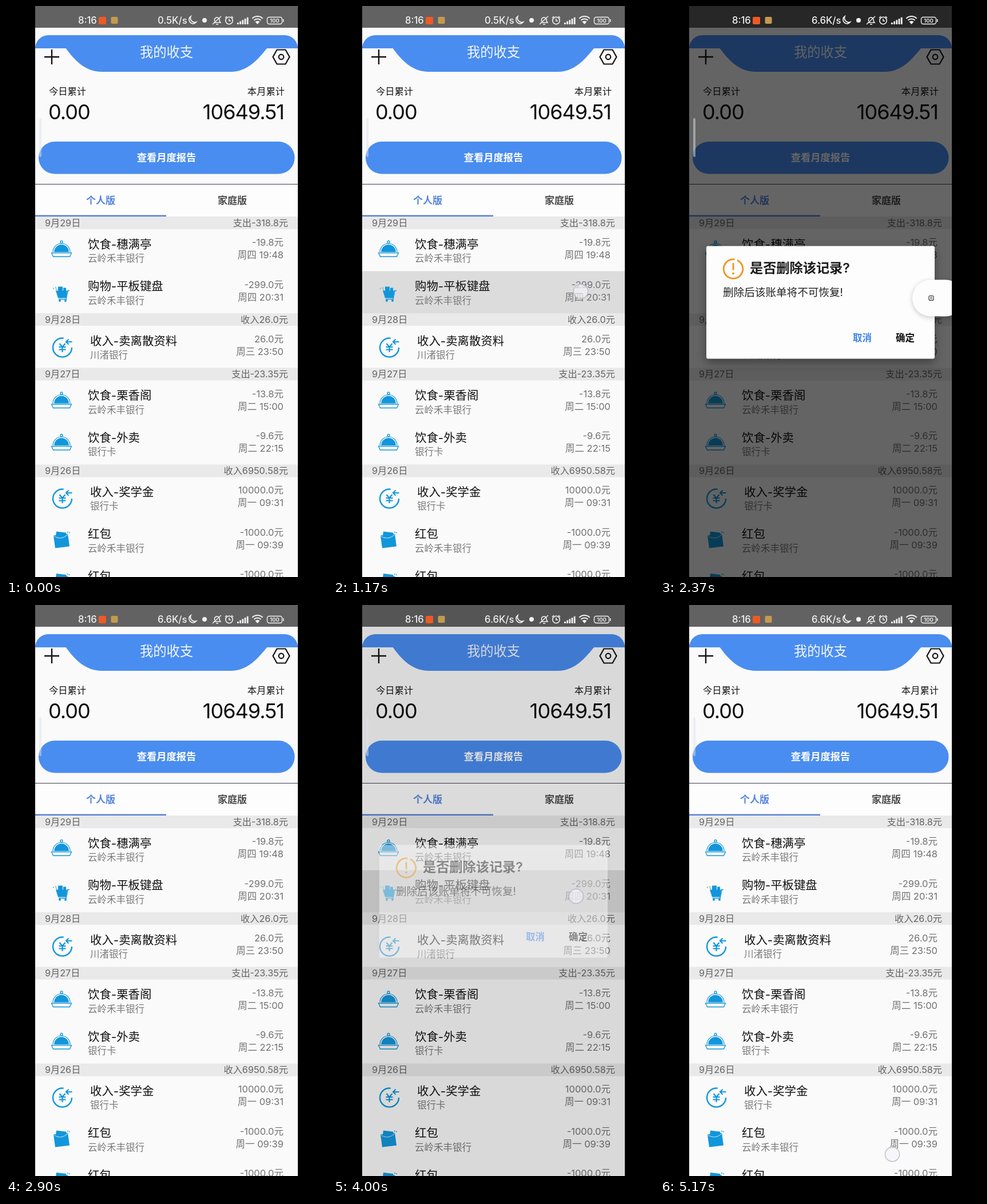
An HTML page with a canvas that plays this animation: 561 by 998 pixels, repeating every 5210 ms.

```html
<!DOCTYPE html>
<html lang="zh-CN">
<head>
<meta charset="utf-8">
<title>我的收支</title>
<style>
html, body { margin: 0; width: 100%; height: 100%; overflow: hidden; background: #000; }
canvas { display: block; }
</style>
</head>
<body>
<canvas id="stage" width="561" height="998"></canvas>
<script>
const ctx = document.getElementById('stage').getContext('2d');
const LOOP = 5210, L = 51, R = 510, W = R - L;
const FONT = '"Inter", "Noto Sans CJK SC", "Noto Sans CJK", sans-serif';
const BLUE = '#4a8df0', ICON = '#1296db', PAPER = '#fafafa';

// [top, date, sum]
const HEADERS = [
  [368, '9月29日', '支出-318.8元'],
  [537, '9月28日', '收入26.0元'],
  [632.5, '9月27日', '支出-23.35元'],
  [801.5, '9月26日', '收入6950.58元']
];
// [top, icon, name, bank, sum, time]
const ROWS = [
  [390, dish, '饮食-穗满亭', '云岭禾丰银行', '-19.8元', '周四 19:48'],
  [463.5, cart, '购物-平板键盘', '云岭禾丰银行', '-299.0元', '周四 20:31'],
  [559, income, '收入-卖离散资料', '川渚银行', '26.0元', '周三 23:50'],
  [654.5, dish, '饮食-栗香阁', '云岭禾丰银行', '-13.8元', '周二 15:00'],
  [728, dish, '饮食-外卖', '银行卡', '-9.6元', '周二 22:15'],
  [823, income, '收入-奖学金', '银行卡', '10000.0元', '周一 09:31'],
  [896.5, packet, '红包', '云岭禾丰银行', '-1000.0元', '周一 09:39'],
  [970, packet, '红包', '云岭禾丰银行', '-1000.0元', '周一 09:41']
];

// Each long press opens the dialog; times in ms
const PRESSES = [
  { x: 433, y: 499, down: 930, open: 1470, up: 1700, ball: 1750, swap: 2180, cancel: 2540, close: 2660 },
  { x: 425, y: 509, down: 3390, open: 3925, up: 4140, ball: 4190, swap: 9999, cancel: 4470, close: 4610 }
];
const TOUCHES = [[406, 960, 5100, LOOP]];
for (const p of PRESSES) {
  TOUCHES.push([p.x, p.y, p.down, p.up], [356, 592, p.cancel, p.close - 20]);
}

const ramp = (t, a, b) => Math.min(1, Math.max(0, (t - a) / (b - a)));
const smooth = u => u * u * (3 - 2 * u);
const easeOut = u => 1 - (1 - u) ** 3;

function text(s, x, cy, size, color, align = 'left', weight = 400) {
  ctx.font = `${weight} ${size}px ${FONT}`;
  ctx.textAlign = align;
  ctx.fillStyle = color;
  ctx.fillText(s, x, cy + size * 0.37);
}
function rect(x, y, w, h, color) {
  ctx.fillStyle = color;
  ctx.fillRect(x, y, w, h);
}
function round(x, y, w, h, r, color) {
  ctx.beginPath();
  ctx.roundRect(x, y, w, h, r);
  ctx.fillStyle = color;
  ctx.fill();
}
function disc(x, y, r, color) {
  ctx.beginPath();
  ctx.arc(x, y, r, 0, 7);
  ctx.fillStyle = color;
  ctx.fill();
}
function arc(x, y, r, a, b, color, width) {
  ctx.beginPath();
  ctx.arc(x, y, r, a, b);
  ctx.strokeStyle = color;
  ctx.lineWidth = width;
  ctx.stroke();
}
function line(d, color, width) {
  ctx.strokeStyle = color;
  ctx.lineWidth = width;
  ctx.stroke(new Path2D(d));
}
function shape(d, color) {
  ctx.fillStyle = color;
  ctx.fill(new Path2D(d));
}
function at(x, y, draw) {
  ctx.save();
  ctx.translate(x, y);
  draw();
  ctx.restore();
}

// Icons, drawn around the origin
function dish() {
  arc(0, -13.5, 2, 0, 7, ICON, 1.3);
  line('M-15 4 A15 15 0 0 1 15 4', ICON, 1.2);
  shape('M-12.8 4 A12.8 13 0 0 1 12.8 4Z', ICON);
  line('M-17.5 5.5 H17.5 L14.5 12 H-14.5Z', ICON, 1.3);
}
function cart() {
  at(0, 2, () => {
    shape('M-10 -4 H10 L8 9 H-6Z', ICON);
    shape('M-6 -11 H2 V-3 H-6Z M3 -9 H8 V-3 H3Z', ICON);
    line('M-5 11 H8 L11 -4 H14', ICON, 1.5);
    disc(-3, 13.5, 2, ICON);
    disc(7, 13.5, 2, ICON);
    for (const [x, y] of [[-15, -9], [-11, -10], [-10, -7]]) rect(x, y, 2, 2, '#6fc0a8');
  });
}
function income() {
  at(1.5, 2, () => {
    arc(0, 0, 16.5, 0, 4.85, ICON, 2.4);
    line('M-5 -7 L0 -1 L5 -7 M0 -1 V8 M-6 -1 H6 M-6 3.5 H6', ICON, 2.2);
    line('M17 -10 H7 M11 -14.5 L6.5 -10 L11 -5.5', ICON, 2.2);
  });
}
function packet() {
  shape('M-9 -14 L8 -12 L12 8 L-12 8Z', ICON);
  shape('M-14 -7 L11 -10 L14 12 L-11 15Z', ICON);
  line('M-14 -6 Q0 2 11 -9', '#8fd0f0', 1.1);
  disc(11, -13, 1, ICON);
  disc(14, -12, 0.9, ICON);
}

function header() {
  round(L, 51, W, 23, [24, 24, 0, 0], BLUE);
  shape('M104 73 C119 94 138 115 168 115 H393 C423 115 441 92 457 73Z', BLUE);
  text('我的收支', 280.5, 80, 23.3, '#f4f8ff', 'center');
  line('M67 89 H93 M80 76 V102', '#111', 2.4);
  line('M473.5 76.5 H488.5 L495.5 89 L488.5 101.5 H473.5 L466.5 89Z', '#111', 2.2);
  arc(481, 89, 4.3, 0, 7, '#111', 2.2);

  text('今日累计', 75, 149, 16.3, '#151515');
  text('本月累计', 487, 149, 16.3, '#151515', 'right');
  ctx.letterSpacing = '-1px';
  text('0.00', 74, 185, 36, '#0c0c0c');
  text('10649.51', 486, 185, 36, '#0c0c0c', 'right');
  ctx.letterSpacing = '0px';

  round(57, 237, 447.5, 56.5, 28, BLUE);
  text('查看月度报告', 280.5, 265, 17.3, '#fff', 'center', 600);

  rect(L, 312, W, 56, '#fdfdfd');
  rect(L, 311, W, 1, '#3c4150');
  text('个人版', 165.5, 340, 17, '#5585dd', 'center', 600);
  text('家庭版', 395.5, 340, 17, '#4c4c4c', 'center', 600);
  rect(L, 365.5, 229, 2.5, '#5b82d8');
}

function list(press) {
  for (const [y, date, sum] of HEADERS) {
    rect(L, y, W, 22, '#e9e9e9');
    text(date, 68, y + 11, 16.2, '#646464');
    text(sum, 493, y + 11, 16.2, '#646464', 'right');
  }
  if (press > 0) rect(L, 463.5, W, 73.5, `rgba(0,0,0,${0.12 * press})`);
  for (const [y, icon, name, bank, sum, when] of ROWS) {
    const x = icon === income ? 147 : 143;
    at(97, y + 36, icon);
    text(name, x, y + 26, 20.4, '#101010');
    text(bank, x, y + 51, 16.5, '#7a7a7a');
    text(sum, 485, y + 23, 16.5, '#727272', 'right');
    text(when, 485, y + 45, 16.5, '#727272', 'right');
  }
}

function statusBar(t) {
  const c = '#f2f2f2';
  text('8:16', 126, 25, 16.6, c, 'left', 500);
  round(162, 19, 13, 13, 2, '#ee5a24');
  round(183.5, 19, 12, 12, 2, '#c39a4e');
  text(t < 1900 ? '0.5K/s' : '6.6K/s', 265, 25, 16.6, c, 'left', 500);
  line('M323 18 A7 7 0 1 0 332.5 28 A7.5 7.5 0 0 1 323 18Z', c, 1.7);
  disc(347, 25, 4, c);
  line('M363 29 H375 L373 26 V23 A4.5 4.5 0 0 0 364.5 23 V27 M367 32 H371 M376 18 L361 32', c, 1.5);
  arc(390, 25.5, 6.2, 0, 7, c, 1.6);
  line('M390 22 V26 H393 M383 21 L386 18 M397 21 L394 18', c, 1.5);
  for (let i = 0; i < 5; i++) rect(404 + i * 4.2, 29 - i * 2.3, 2.8, 3 + i * 2.3, c);
  for (const r of [13, 8.5]) arc(439.5, 31, r, -2.35, -0.79, c, 2);
  shape('M439.5 32 L435.5 27.5 Q439.5 24.5 443.5 27.5Z', c);
  ctx.beginPath();
  ctx.roundRect(456.5, 19.5, 26, 12, 3.5);
  ctx.strokeStyle = c;
  ctx.lineWidth = 1.4;
  ctx.stroke();
  rect(484, 23, 1.5, 5, c);
  text('100', 469.5, 25.5, 9.5, c, 'center', 600);
}

function dialog(alpha) {
  ctx.save();
  ctx.globalAlpha = alpha;
  // the shadow shows through a translucent sheet, so it grows in late
  ctx.shadowColor = `rgba(0,0,0,${0.35 * alpha ** 3})`;
  ctx.shadowBlur = 16;
  ctx.shadowOffsetY = 7;
  round(81, 419.5, 399, 197, 3, '#fdfdfd');
  ctx.shadowColor = 'transparent';
  arc(128, 459.5, 16.8, -1.15, 4.85, '#f0941e', 2.8);
  round(126.6, 449, 2.8, 13, 1.4, '#f0941e');
  disc(128, 467.5, 1.9, '#f0941e');
  text('是否删除该记录?', 157, 457, 23.2, '#1c1c1c', 'left', 600);
  text('删除后该账单将不可恢复!', 110, 500, 18.6, '#222');
  text('取消', 337, 580, 16.5, '#3f83e6', 'left', 600);
  text('确定', 412, 580, 16.5, '#111', 'left', 600);
  ctx.restore();
}

function ball(p, t) {
  const show = easeOut(ramp(t, p.ball, p.ball + 200)) * (1 - smooth(ramp(t, p.cancel + 60, p.cancel + 260)));
  if (show <= 0) return;
  const swap = smooth(ramp(t, p.swap, p.swap + 180));
  const x = R + 8 - show * (71 + 6 * swap), y = p.y + 11.5;
  ctx.save();
  ctx.shadowColor = 'rgba(0,0,0,.22)';
  ctx.shadowBlur = 9;
  ctx.shadowOffsetY = 2;
  round(x, y - 32, 90, 64, 32, '#fdfdfd');
  ctx.restore();
  at(x + 33, y, () => {
    if (swap < 0.5) {
      const k = 1 - swap;
      arc(0, 0, 10.5 * k, 0, 7, '#222', 2.3);
      disc(4.5 * k, -0.5, 2.4 * k, '#222');
    } else {
      ctx.beginPath();
      ctx.roundRect(-4, -4, 8, 8, 2);
      ctx.strokeStyle = '#222';
      ctx.lineWidth = 1.1;
      ctx.stroke();
      line('M-2 -1.3 H2 M-2 1.3 H2', '#222', 0.9);
    }
  });
}

function draw(t) {
  let press = 0, dim = 0, open = 0;
  for (const p of PRESSES) {
    const gone = ramp(t, p.close, p.close + 190);
    press += smooth(ramp(t, p.down + 70, p.down + 180)) * (1 - ramp(t, p.up, p.up + 150));
    dim += smooth(ramp(t, p.open, p.open + 250)) * (1 - smooth(gone));
    open += ramp(t, p.open, p.open + 165) * (1 - gone);
  }

  rect(0, 0, 561, 998, '#000');
  ctx.save();
  ctx.beginPath();
  ctx.rect(L, 0, W, 998);
  ctx.clip();
  rect(L, 0, W, 998, PAPER);
  rect(L, 0, W, 38, '#626262');
  header();
  list(press);
  if (dim > 0) rect(L, 0, W, 998, `rgba(0,0,0,${0.6 * dim})`);
  statusBar(t);
  if (open > 0) dialog(open);
  PRESSES.forEach(p => ball(p, t));
  round(58, 196, 4, 68, 2, 'rgba(220,225,235,.5)');
  for (const [x, y, a, b] of TOUCHES) {
    if (t < a || t >= b) continue;
    disc(x, y, 13, 'rgba(246,246,250,.65)');
    arc(x, y, 12.6, 0, 7, 'rgba(178,178,196,.75)', 1.6);
  }
  ctx.restore();
}

function tick() {
  draw(performance.now() % LOOP);
  requestAnimationFrame(tick);
}
tick();
</script>
</body>
</html>
```
